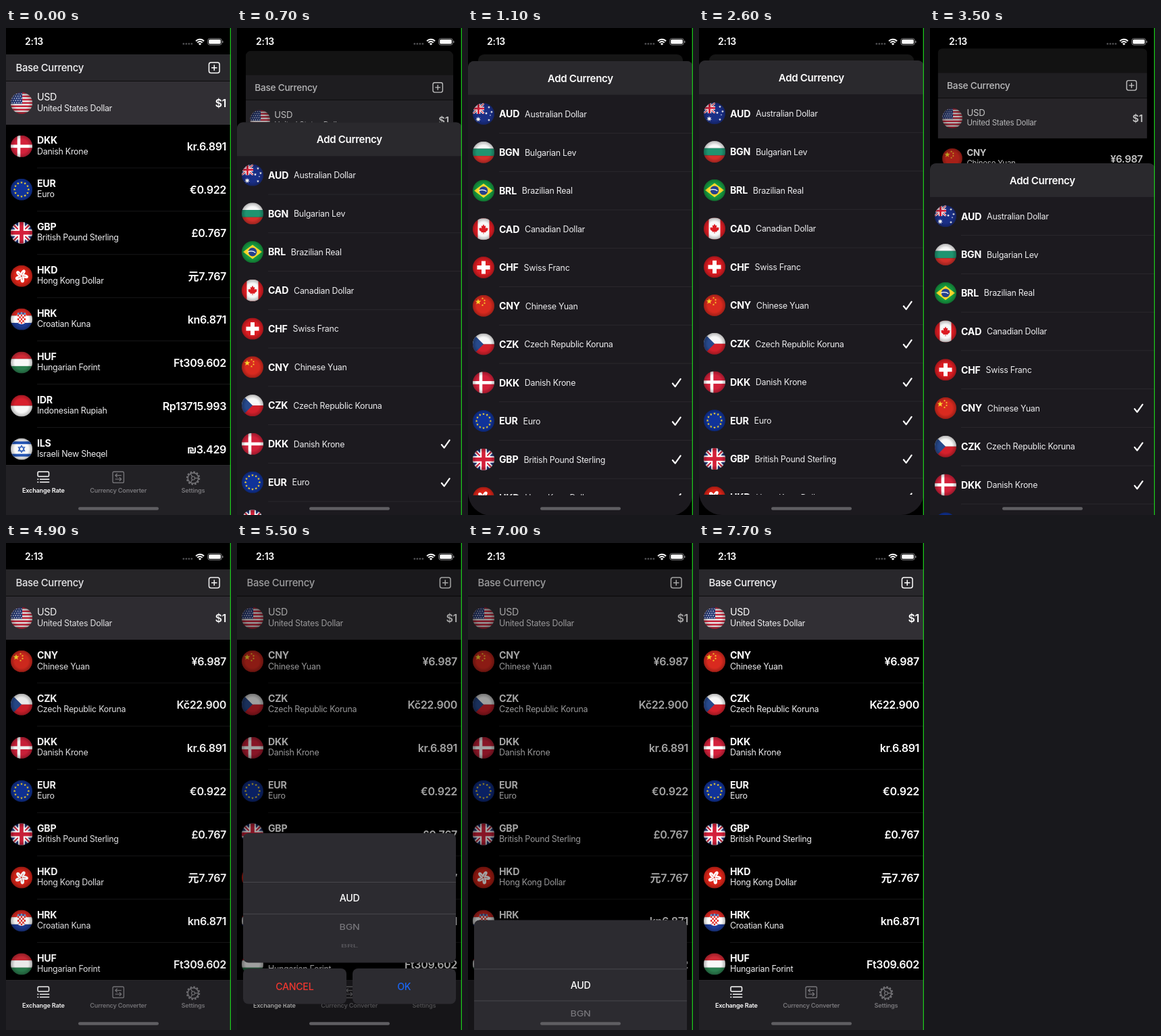
An HTML page with a canvas for the animation above (8 s loop, 333 by 720 pixels).

```html
<!DOCTYPE html>
<html lang="en">
<head>
<meta charset="utf-8">
<title>Exchange rates</title>
<style>
  html, body { margin: 0; width: 100%; height: 100%; overflow: hidden; background: #000; }
  canvas { display: block; width: 333px; height: 720px; }
</style>
</head>
<body>
<canvas id="stage"></canvas>
<script>
const W = 333, H = 720, LOOP = 8000, TAU = Math.PI * 2;
const canvas = document.getElementById('stage');
const ctx = canvas.getContext('2d');
const dpr = window.devicePixelRatio || 1;
canvas.width = W * dpr;
canvas.height = H * dpr;

const names = {
  USD: 'United States Dollar', AUD: 'Australian Dollar', BGN: 'Bulgarian Lev',
  BRL: 'Brazilian Real', CAD: 'Canadian Dollar', CHF: 'Swiss Franc',
  CNY: 'Chinese Yuan', CZK: 'Czech Republic Koruna', DKK: 'Danish Krone',
  EUR: 'Euro', GBP: 'British Pound Sterling', HKD: 'Hong Kong Dollar',
  HRK: 'Croatian Kuna', HUF: 'Hungarian Forint', IDR: 'Indonesian Rupiah',
  ILS: 'Israeli New Sheqel'
};
const rates = {
  USD: '$1', CNY: '¥6.987', CZK: 'Kč22.900', DKK: 'kr.6.891', EUR: '€0.922',
  GBP: '£0.767', HKD: '元7.767', HRK: 'kn6.871', HUF: 'Ft309.602',
  IDR: 'Rp13715.993', ILS: '₪3.429'
};
const before = ['USD', 'DKK', 'EUR', 'GBP', 'HKD', 'HRK', 'HUF', 'IDR', 'ILS'];
const after = ['USD', 'CNY', 'CZK', ...before.slice(1, 7)];
const choices = ['AUD', 'BGN', 'BRL', 'CAD', 'CHF', 'CNY', 'CZK', 'DKK', 'EUR', 'GBP', 'HKD'];

// Drawing helpers
function rect(x, y, w, h, color) {
  ctx.fillStyle = color;
  ctx.fillRect(x, y, w, h);
}

function roundPath(x, y, w, h, r) {
  ctx.beginPath();
  ctx.roundRect(x, y, w, h, r);
}

function roundBox(x, y, w, h, r, color) {
  roundPath(x, y, w, h, r);
  ctx.fillStyle = color;
  ctx.fill();
}

function disc(x, y, r, color) {
  ctx.beginPath();
  ctx.arc(x, y, r, 0, TAU);
  ctx.fillStyle = color;
  ctx.fill();
}

function poly(points, color) {
  ctx.beginPath();
  points.forEach(([x, y]) => ctx.lineTo(x, y));
  ctx.closePath();
  ctx.fillStyle = color;
  ctx.fill();
}

function line(points, color, width) {
  ctx.beginPath();
  points.forEach(([x, y], i) => i ? ctx.lineTo(x, y) : ctx.moveTo(x, y));
  ctx.strokeStyle = color;
  ctx.lineWidth = width;
  ctx.stroke();
}

// y is the middle of the capital letters
function text(str, x, y, size, weight, color = '#fff', align = 'left') {
  ctx.font = `${weight} ${size}px Inter, "Noto Sans CJK SC", "Noto Sans CJK JP", sans-serif`;
  ctx.letterSpacing = -0.02 * size + 'px';
  ctx.textAlign = align;
  ctx.fillStyle = color;
  ctx.fillText(str, x, y + size * 0.364);
  return ctx.measureText(str).width;
}

function star(x, y, r, color, tips = 5, inner = 0.42) {
  const points = [];
  for (let i = 0; i < tips * 2; i++) {
    const a = i * Math.PI / tips - Math.PI / 2;
    const d = i % 2 ? r * inner : r;
    points.push([x + d * Math.cos(a), y + d * Math.sin(a)]);
  }
  poly(points, color);
}

// Flags fill a square from -16 to 16
function bands(...colors) {
  const h = 32 / colors.length;
  colors.forEach((c, i) => rect(-16, -16 + i * h, 32, h + 0.1, c));
}

function cross(x, width, color) {
  rect(x - width / 2, -16, width, 32, color);
  rect(-16, -width / 2, 32, width, color);
}

function union() {
  bands('#21357f');
  for (const [color, width] of [['#fff', 6], ['#d3203a', 2]]) {
    line([[-16, -16], [16, 16]], color, width);
    line([[-16, 16], [16, -16]], color, width);
  }
  cross(0, 10, '#fff');
  cross(0, 5.6, '#d3203a');
}

const flags = {
  USD() {
    for (let i = 0; i < 13; i++) rect(-16, -16 + i * 32 / 13, 32, 2.6, i % 2 ? '#f3eeee' : '#c9263c');
    rect(-16, -16, 17, 17.2, '#2b3d78');
    for (let r = 0; r < 5; r++)
      for (let c = 0; c < 5; c++) disc(-14 + c * 3.4 - (r % 2) * 1.5, -13.5 + r * 3.3, 0.75, '#fff');
  },
  DKK() { bands('#d3213b'); cross(-4, 4.6, '#fff'); },
  EUR() {
    bands('#10339a');
    for (let i = 0; i < 12; i++) star(10.4 * Math.cos(i * TAU / 12), 10.4 * Math.sin(i * TAU / 12), 2, '#f6d32d');
  },
  GBP: union,
  HKD() {
    bands('#dc2418');
    for (let i = 0; i < 5; i++) {
      ctx.save();
      ctx.rotate(i * TAU / 5 + 0.25);
      ctx.beginPath();
      ctx.ellipse(0.8, -5.4, 2.8, 4.6, 0.35, 0, TAU);
      ctx.fillStyle = '#fff';
      ctx.fill();
      line([[0, -2], [1, -6]], '#dc2418', 0.6);
      ctx.restore();
    }
  },
  HRK() {
    bands('#e02a24', '#fff', '#1d3c96');
    roundBox(-6.5, -7, 13, 14.5, [0, 0, 6, 6], '#fff');
    ctx.save();
    roundPath(-6, -7, 12, 14, [0, 0, 6, 6]);
    ctx.clip();
    for (let i = 0; i < 25; i++)
      if (i % 2 === 0) rect(-6 + (i % 5) * 2.4, -7 + Math.floor(i / 5) * 2.8, 2.4, 2.8, '#e02a24');
    ctx.restore();
    for (let i = -2; i <= 2; i++) rect(i * 2.5 - 1, -10.5 + Math.abs(i) * 0.4, 2, 3, i % 2 ? '#2a4fa8' : '#5ba7d8');
  },
  HUF() { bands('#cf2a36', '#f8f8f8', '#2c8050'); },
  IDR() { bands('#d81f2d', '#f8f8f8'); },
  ILS() {
    bands('#f8f8f8');
    rect(-16, -11.2, 32, 4, '#2455b5');
    rect(-16, 7.2, 32, 4, '#2455b5');
    for (const s of [1, -1])
      line([[0, -5.4 * s], [4.7, 2.7 * s], [-4.7, 2.7 * s], [0, -5.4 * s]], '#2455b5', 1.1);
  },
  CNY() {
    bands('#d92a1f');
    star(-8, -6, 4.6, '#fbd42e');
    [[-1.5, -11], [1.5, -8], [1.5, -4], [-1.5, -1]].forEach(([x, y]) => star(x, y, 1.7, '#fbd42e'));
  },
  CZK() {
    bands('#f8f8f8', '#d4202c');
    poly([[-16, -16], [0, 0], [-16, 16]], '#27498c');
  },
  AUD() {
    bands('#1a2f86');
    ctx.save();
    ctx.beginPath();
    ctx.rect(-16, -16, 17, 16);
    ctx.clip();
    ctx.translate(-7.5, -8);
    ctx.scale(0.54, 0.5);
    union();
    ctx.restore();
    star(-8, 8, 4.2, '#fff', 7);
    [[8, -10], [4, -1], [12, -3], [8, 9]].forEach(([x, y]) => star(x, y, 2.1, '#fff', 7));
    star(10, 2, 1.2, '#fff');
  },
  BGN() { bands('#f8f8f8', '#1f9470', '#d3302a'); },
  BRL() {
    bands('#169b41');
    poly([[-14, 0], [0, -10.5], [14, 0], [0, 10.5]], '#f8d72c');
    disc(0, 0, 6.3, '#26408c');
    ctx.beginPath();
    ctx.arc(-2, 10, 11, -2.05, -0.95);
    ctx.strokeStyle = '#fff';
    ctx.lineWidth = 1.2;
    ctx.stroke();
  },
  CAD() {
    bands('#dd1c23');
    rect(-8.5, -16, 17, 32, '#f8f8f8');
    const half = [[0, -7], [1.6, -4.2], [3.2, -5], [2.8, -0.8], [4.6, -2.4], [5, -1.2], [6.8, -1.5],
      [6, 0.9], [6.6, 1.5], [3.2, 4], [3.5, 5], [0.4, 4.6], [0.4, 7.2]];
    poly([...half, ...half.map(([x, y]) => [-x, y]).reverse()], '#dd1c23');
  },
  CHF() {
    bands('#db1c22');
    rect(-9.5, -3, 19, 6, '#fff');
    rect(-3, -9.5, 6, 19, '#fff');
  }
};

function flag(code, x, y) {
  ctx.save();
  ctx.translate(x, y);
  ctx.beginPath();
  ctx.arc(0, 0, 16, 0, TAU);
  ctx.clip();
  flags[code]();
  const shade = ctx.createRadialGradient(0, 0, 10, 0, 0, 16.2);
  shade.addColorStop(0, 'rgba(0,0,0,0)');
  shade.addColorStop(1, 'rgba(0,0,0,.28)');
  rect(-16, -16, 32, 32, shade);
  ctx.restore();
}

// Screen parts
function statusBar() {
  text('2:13', 28, 20.3, 14, 600);
  for (let i = 0; i < 4; i++) disc(262.8 + i * 4, 23.4, 1.4, '#4c4c4e');
  ctx.lineWidth = 2;
  ctx.strokeStyle = '#fff';
  for (const r of [5, 8.2]) {
    ctx.beginPath();
    ctx.arc(287, 25, r, -Math.PI * 0.76, -Math.PI * 0.24);
    ctx.stroke();
  }
  ctx.beginPath();
  ctx.moveTo(287, 25.4);
  ctx.arc(287, 25.4, 3, -Math.PI * 0.76, -Math.PI * 0.24);
  ctx.fillStyle = '#fff';
  ctx.fill();
  roundPath(298.7, 15.5, 20.5, 9.6, 3);
  ctx.strokeStyle = '#8a8a8c';
  ctx.lineWidth = 0.9;
  ctx.stroke();
  roundBox(300.2, 17, 17.5, 6.6, 1.6, '#fff');
  roundBox(320.2, 18.8, 1.2, 3.2, 0.6, '#8a8a8c');
}

function tabBar() {
  const off = '#79787c';
  rect(0, 646, W, 74, '#222125');
  rect(0, 646, W, 0.6, '#302f33');

  roundPath(47, 656, 16.5, 7, 1.6);
  ctx.strokeStyle = '#fff';
  ctx.lineWidth = 1.5;
  ctx.stroke();
  for (const y of [667.2, 671.4]) {
    line([[46.3, y], [48.3, y]], '#fff', 1.5);
    line([[50, y], [64.2, y]], '#fff', 1.5);
  }

  roundPath(158, 656, 16.4, 16.4, 2);
  ctx.strokeStyle = off;
  ctx.lineWidth = 1.3;
  ctx.stroke();
  line([[170.8, 661.5], [162, 661.5]], off, 1.2);
  line([[164.6, 658.8], [161.8, 661.5], [164.6, 664.2]], off, 1.2);
  line([[161.6, 667], [170.4, 667]], off, 1.2);
  line([[167.8, 664.3], [170.6, 667], [167.8, 669.7]], off, 1.2);

  ctx.save();
  ctx.translate(277, 665.5);
  ctx.strokeStyle = off;
  for (const [r, width, dash] of [[9.3, 1.8, [2.6, 2.27]], [7.8, 1.4, []], [2.5, 1.2, []]]) {
    ctx.beginPath();
    ctx.arc(0, 0, r, 0, TAU);
    ctx.lineWidth = width;
    ctx.setLineDash(dash);
    ctx.stroke();
  }
  for (const a of [0, TAU / 3, TAU * 2 / 3]) {
    const c = Math.cos(a), s = Math.sin(a);
    line([[2.5 * c, 2.5 * s], [7.5 * c, 7.5 * s]], off, 1.2);
  }
  ctx.restore();

  text('Exchange Rate', 55.3, 683.3, 9.1, 600, '#fff', 'center');
  text('Currency Converter', 166.3, 683.3, 9.1, 600, off, 'center');
  text('Settings', 277, 683.3, 9.1, 600, off, 'center');
}

function home(codes) {
  rect(0, 0, W, H, '#000');
  codes.forEach((code, i) => {
    const y = 110.9 + i * 63.94;
    if (!i) rect(0, 79, W, 64, '#312f34');
    else rect(46, y + 31.7, W - 46, 0.8, '#1d1d1f');
    flag(code, 23, y);
    text(code, 46, y - 8.8, 14.2, i ? 700 : 400);
    text(names[code], 46, y + 7.2, 12.4, 400, '#ececee');
    text(rates[code], 326, y + 0.4, 16, 600, '#fff', 'right');
  });
  rect(0, 39, W, 39.3, '#28272b');
  text('Base Currency', 14.5, 58.8, 14.8, 500, '#f4f4f6');
  roundPath(300.4, 51, 15.6, 15.6, 3);
  ctx.strokeStyle = '#fff';
  ctx.lineWidth = 1.5;
  ctx.stroke();
  line([[304, 58.8], [312.4, 58.8]], '#fff', 1.5);
  line([[308.2, 54.6], [308.2, 63]], '#fff', 1.5);
  tabBar();
}

// The home screen shrinks into a card as the sheet rises
function homeCard(codes, p) {
  const scale = 1 - 0.09 * p;
  ctx.save();
  ctx.translate(W / 2 * (1 - scale), 39 * p);
  ctx.scale(scale, scale);
  if (p) {
    roundPath(0, 0, W, H, 10 * p);
    ctx.clip();
  }
  home(codes);
  if (p) {
    rect(0, 0, W, 39, `rgba(255,255,255,${0.12 * p})`);
    rect(0, 0, W, H, `rgba(0,0,0,${0.3 * p})`);
  }
  ctx.restore();
}

function sheet(top, checked) {
  ctx.save();
  roundPath(0, top, W, H - 48, [9, 9, 34, 34]);
  ctx.clip();
  rect(0, top, W, H, '#1c1a1f');
  ctx.save();
  ctx.beginPath();
  ctx.rect(0, top + 50, W, 592);
  ctx.clip();
  choices.forEach((code, i) => {
    const y = top + 78.3 + i * 56.75;
    flag(code, 23, y);
    const width = text(code, 46, y + 0.2, 14.2, 700);
    text(names[code], 46 + width + 8, y + 0.2, 12.4, 400, '#ececee');
    rect(46, y + 28, W - 46, 0.8, '#2d2b30');
    if (checked.includes(code)) {
      ctx.lineCap = ctx.lineJoin = 'round';
      line([[302.8, y + 1.2], [306.6, y + 5.8], [314.6, y - 5.4]], '#fff', 2.2);
      ctx.lineCap = 'butt';
      ctx.lineJoin = 'miter';
    }
  });
  ctx.restore();
  rect(0, top, W, 50, '#2a292d');
  text('Add Currency', 166.3, top + 25.5, 15, 600, '#fff', 'center');
  ctx.restore();
}

function wheelItem(str, y, squash, color) {
  ctx.save();
  ctx.translate(166.5, y);
  ctx.scale(1, squash);
  text(str, 0, 0, 14.2, 500, color, 'center');
  ctx.restore();
}

function picker(dy) {
  ctx.save();
  ctx.translate(0, dy);
  roundBox(9, 429, 315, 191.5, 8, '#2c2b30');
  rect(9, 501, 315, 0.9, '#4b4a4f');
  rect(9, 548, 315, 0.9, '#4b4a4f');
  wheelItem('AUD', 525, 1, '#fff');
  wheelItem('BGN', 567.3, 0.85, '#77767b');
  wheelItem('BRL', 595.7, 0.45, '#58575c');
  roundBox(9, 629, 153, 52.5, 8, '#2c2b30');
  roundBox(171, 629, 153, 52.5, 8, '#2c2b30');
  text('CANCEL', 85.3, 655.5, 14.2, 500, '#f0372f', 'center');
  text('OK', 247.3, 655.5, 14.2, 500, '#1a66f5', 'center');
  ctx.restore();
}

// Timeline
const clamp = v => Math.min(1, Math.max(0, v));

function spring(ms) {
  const k = 0.014 * Math.max(0, ms);
  return 1 - (1 + k) * Math.exp(-k);
}

function sheetAt(t) {
  if (t < 500 || t >= 4000) return 0;
  if (t < 1900) return spring(Math.min(t, 1100) - 450);
  return 1 - spring(t - 3436);
}

function pickerAt(t) {
  if (t < 4900 || t >= 7600) return 0;
  return t < 5500 ? spring(t - 4980) : 1 - spring(t - 6893);
}

function dimAt(t) {
  return t < 6000 ? clamp((t - 4850) / 300) : clamp((7600 - t) / 400);
}

function draw(t) {
  ctx.setTransform(dpr, 0, 0, dpr, 0, 0);
  rect(0, 0, W, H, '#000');
  const p = sheetAt(t), q = pickerAt(t), dim = dimAt(t);
  homeCard(t < 1900 ? before : after, p);
  if (p) {
    const checked = ['DKK', 'EUR', 'GBP', 'HKD'];
    if (t >= 1900) checked.push('CNY');
    if (t >= 2600) checked.push('CZK');
    sheet(H - (H - 48) * p, checked);
  }
  if (dim) rect(0, 0, W, H, `rgba(0,0,0,${0.36 * dim})`);
  if (q) picker(291 * (1 - q));
  statusBar();
  roundBox(107, 708.3, 119, 4.4, 2.2, '#5f5e62');
  rect(331.6, 0, 1.4, H, '#1cb81c');
}

const start = performance.now();
function tick() {
  const t = (performance.now() - start) % LOOP;
  draw(Math.floor(t / 100) * 100);
  requestAnimationFrame(tick);
}
tick();
</script>
</body>
</html>
```
